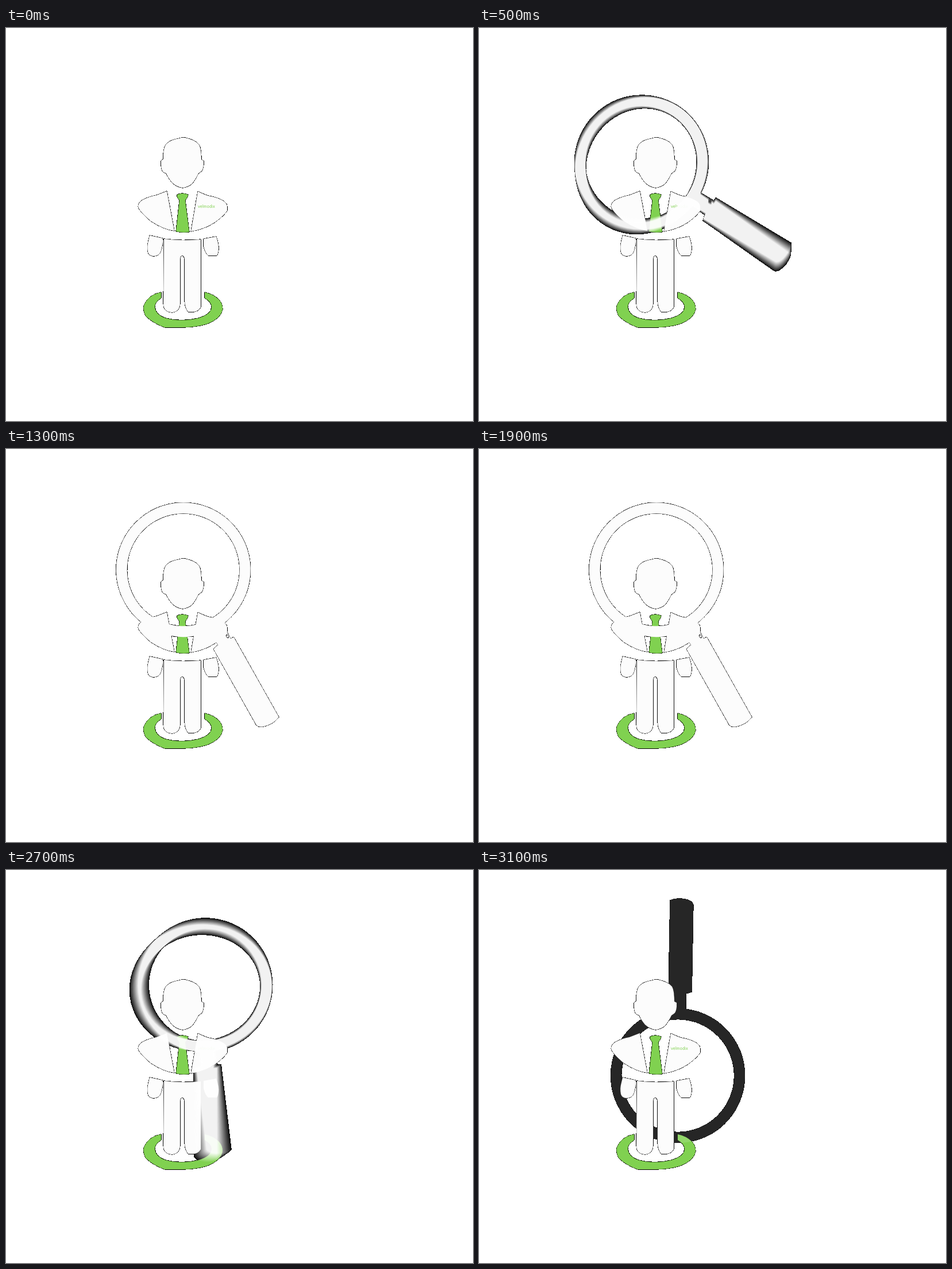
An HTML page with a canvas that plays this animation: 813x684 px, repeating every 3.2 s.

```html
<!DOCTYPE html>
<html lang="en">
<head>
<meta charset="utf-8">
<title>Magnifier and figure</title>
<style>
html, body { margin: 0; height: 100%; overflow: hidden; background: #fff; }
canvas { display: block; }
</style>
</head>
<body>
<canvas id="stage" width="813" height="684"></canvas>
<script>
const W = 813, H = 684, STEP = 100, STEPS = 32, SAMPLES = 51;
const WHITE = '#fcfcfc', GREEN = '#80d150';
const PIVOT = [347.5, 279], REST = 60.6, END = 271;

// The swing grows exponentially with the steps away from rest
const ENTRY = { sign: -1, size: 1.17, rate: 0.4, shutter: 0.4 };
const EXIT = { sign: 1, size: 1.206, rate: 0.3887, shutter: 0.68 };
const SQUASH = 0.009; // per degree of trailing blur

const stage = document.getElementById('stage');
const layer = document.createElement('canvas');
layer.width = W;
layer.height = H;
const view = stage.getContext('2d', { willReadFrequently: true });
const glass = layer.getContext('2d', { willReadFrequently: true });

const body = new Path2D(
  // head
  'M302 192Q306 190 312 191Q330 195 336 203Q340 210 340 229L344 231V238Q343 249 338 251L335 253Q330 264 323 272' +
  'Q313 278 307 278Q298 277 289 269Q281 259 279 253L274 251Q270 247 270 238V231L274 228Q273 212 278 203Q284 195 302 192Z' +
  // jacket
  'M280 284L293 353Q275 351 252 336Q232 319 230 311Q230 304 238 299Q250 293 262 291Z' +
  'M334 284Q340 288 352 292Q370 295 380 302Q385 306 385 311V318Q382 323 373 331Q352 349 322 354Z' +
  // hands
  'M250 361L273 366Q273 380 269 390Q266 397 257 397Q249 397 247 390Q245 380 248 370Z' +
  'M344 367L366 363Q371 378 370 386Q369 394 367 396H352Q347 392 344 380Z' +
  // trousers
  'M275 367Q307 371 339 368V486Q334 494 326 494H317Q311 486 311 474V402Q310 396 307 396' +
  'Q303 396 303 404V480Q302 494 289 495Q274 494 274 480Z');

const accents = new Path2D(
  'M298 290Q307 286 317 290L316 294L312 300L319 355Q307 357 296 354L302 300L298 294Z' +
  'M270 460V470Q259 477 259 485Q260 499 278 505Q305 512 335 505Q358 498 358 485Q357 476 346 470V460' +
  'Q361 463 371 473Q377 480 377 489Q375 505 350 515Q330 521 307 521H276Q255 513 243 501Q238 490 240 483Q248 464 270 460Z');

// Pivot at the origin, handle along +x
const magnifier = new Path2D(
  'M38 0A117 117 0 1 1-196 0A117 117 0 1 1 38 0Z' +
  'M19 0A98 98 0 1 0-177 0A98 98 0 1 0 19 0Z' +
  'M34-13H70V12H34Z' +
  'M56-10A3.5 2 0 1 0 63-10A3.5 2 0 1 0 56-10Z' +
  'M66-19H226Q231-8 229 4Q227 20 219 22H67L65 16Z');

// Angle, blur sweep (both in degrees) and opacity at step k
function motion(k) {
  const { sign, size, rate, shutter } = k < 16 ? ENTRY : EXIT;
  const x = Math.max(13 - k, k - 19, 0);
  const swing = size * Math.expm1(rate * x);
  const alpha = 1 - 0.85 * (x / 12) ** 7;
  if (k === STEPS - 1) return { angle: END, blur: 0, alpha };
  return { angle: REST + sign * swing, blur: shutter * rate * swing, alpha };
}

// Fill with a faint rim that the matte turns into a dark hairline
function paint(ctx, path, color) {
  ctx.fillStyle = ctx.strokeStyle = color;
  ctx.lineWidth = 0.7;
  ctx.globalAlpha = 0.13;
  ctx.stroke(path);
  ctx.globalAlpha = 1;
  ctx.fill(path);
}

function pose(degrees, squash = 0) {
  glass.setTransform(1, 0, 0, 1, ...PIVOT);
  glass.rotate(degrees * Math.PI / 180);
  glass.scale(1 - squash, 1 + squash);
}

function drawMagnifier(k) {
  const { angle, blur, alpha } = motion(k);
  glass.setTransform(1, 0, 0, 1, 0, 0);
  glass.clearRect(0, 0, W, H);
  if (blur > 0) {
    glass.globalCompositeOperation = 'lighter';
    glass.globalAlpha = 1 / SAMPLES;
    glass.fillStyle = WHITE;
    for (let i = 0; i < SAMPLES; i++) {
      const lag = i / (SAMPLES - 1);
      pose(angle + blur * (0.5 - lag), SQUASH * blur * lag);
      glass.fill(magnifier);
    }
    glass.globalCompositeOperation = 'source-over';
  } else {
    pose(angle);
    paint(glass, magnifier, WHITE);
  }
  view.globalAlpha = alpha;
  view.drawImage(layer, 0, 0);
  view.globalAlpha = 1;
}

// Put black behind every partly transparent pixel
function matte() {
  const image = view.getImageData(0, 0, W, H), d = image.data;
  for (let i = 0; i < d.length; i += 4) {
    const a = d[i + 3];
    if (a === 0 || a === 255) continue;
    for (let c = i; c < i + 3; c++) d[c] *= a / 255;
    d[i + 3] = a > 6 ? 255 : 0;
  }
  view.putImageData(image, 0, 0);
}

function draw(k) {
  view.clearRect(0, 0, W, H);
  paint(view, body, WHITE);
  paint(view, accents, GREEN);
  view.font = '7px Inter, sans-serif';
  view.fillText('velmodix', 334, 313);
  if (k > 0) drawMagnifier(k);
  matte();
}

let shown = -1;
const start = performance.now();
function tick() {
  const k = Math.floor((performance.now() - start) / STEP) % STEPS;
  if (k !== shown) draw(shown = k);
  requestAnimationFrame(tick);
}
tick();
</script>
</body>
</html>
```
